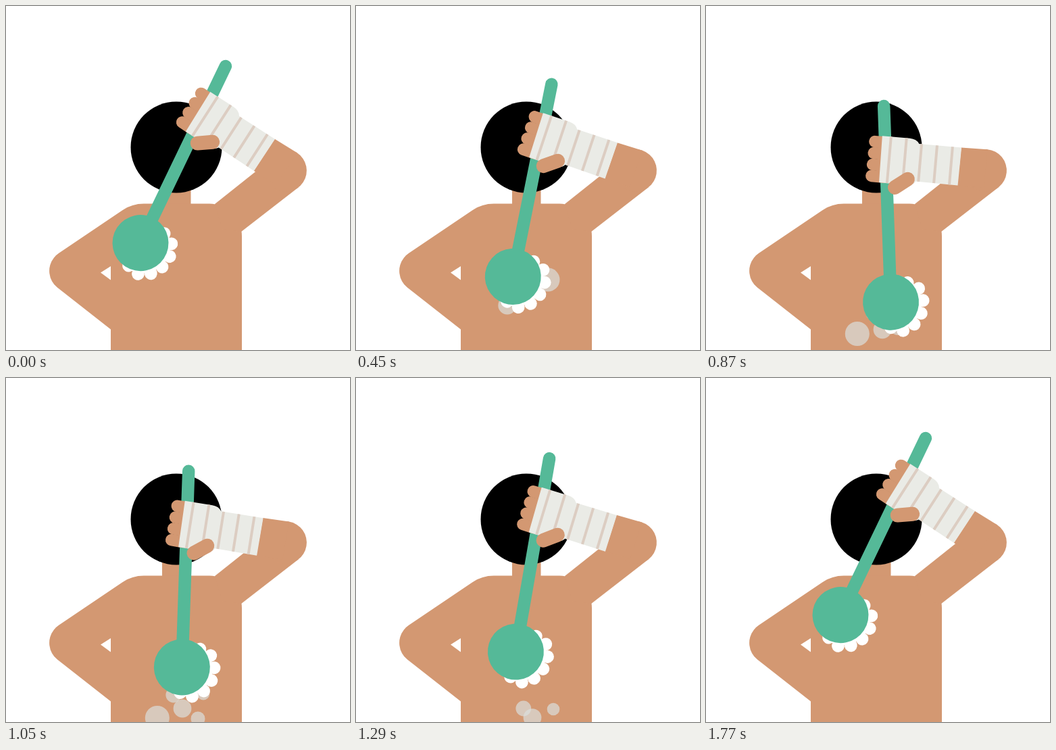
These frames come from a looping animation (509 by 509 pixels, 1800 ms). An HTML page with a canvas:

```html
<!DOCTYPE html>
<html>
<head>
<meta charset="utf-8">
<style>
html, body { margin: 0; width: 100%; height: 100%; overflow: hidden; background: #fff; }
canvas { display: block; width: 509px; height: 509px; }
</style>
</head>
<body>
<canvas id="stage"></canvas>
<script>
const SIZE = 509, LOOP = 1800, STEP = 30;
const SKIN = '#d39872', GREEN = '#55b998', GAUZE = '#eaebe6', STRIPE = '#dccdc2';
const ELBOW = [413.5, 243.5], REST = 33.4, SWING = 28.7;
const RAD = Math.PI / 180;

const canvas = document.getElementById('stage');
const ratio = window.devicePixelRatio || 1;
canvas.width = canvas.height = Math.round(SIZE * ratio);
const ctx = canvas.getContext('2d');

function disc(x, y, r, color) {
  ctx.fillStyle = color;
  ctx.beginPath();
  ctx.arc(x, y, r, 0, 2 * Math.PI);
  ctx.fill();
}

function poly(color, points) {
  ctx.fillStyle = color;
  ctx.beginPath();
  points.forEach(p => ctx.lineTo(p[0], p[1]));
  ctx.fill();
}

function bar(x1, y1, x2, y2, width, color, cap = 'round') {
  ctx.strokeStyle = color;
  ctx.lineWidth = width;
  ctx.lineCap = cap;
  ctx.beginPath();
  ctx.moveTo(x1, y1);
  ctx.lineTo(x2, y2);
  ctx.stroke();
}

function drawBody() {
  ctx.fillStyle = SKIN;
  ctx.fillRect(231, 240, 42.5, 60);
  ctx.beginPath();
  ctx.moveTo(155, 510);
  ctx.lineTo(155, 478.5);
  ctx.arc(95.5, 392, 31.4, 128.5 * RAD, 236.4 * RAD);
  ctx.arc(204, 350, 57.4, 236.4 * RAD, 270 * RAD);
  ctx.arc(301, 340.6, 48, 270 * RAD, 360 * RAD);
  ctx.lineTo(349, 510);
  ctx.fill();
  poly('#fff', [[140, 394.5], [155, 385], [155, 405.5]]);
  // raised upper arm
  poly(SKIN, [[309, 293], [397, 223], [413.5, 243.5], [432.8, 268.2], [348, 334], [320, 330]]);
  disc(252, 209, 67.5, '#000');
}

// Soap drops: x, birth step, growth steps, radius at step i, height at step i
const drops = [
  [223.8, 9, 8, () => 18, i => 398 + 3 * i],
  [284, 10, 4, i => 17.5 - 0.35 * (i - 15), i => 405 + 4.95 * (i - 15)],
  [261, 20, 3, () => 13.4, i => 429.5 + 1.7 * i],
  [247.8, 22, 4, () => 11.4, i => 489 + 2.5 * (i - 43)],
  [292, 25, 4, () => 9.3, i => 490 + 3.3 * (i - 43) + 0.055 * (i - 43) ** 2]
];

function drawDrops(i) {
  for (const [x, birth, grow, radius, height] of drops) {
    const size = radius(i) * Math.min(1, (i - birth) / grow);
    if (size > 0) disc(x, height(i), size, 'rgba(219,223,222,0.69)');
  }
}

function drawBrush() {
  const x = -120.1, y = 207.5, axis = (48 - REST) * RAD;
  disc(x + 5 * Math.cos(axis), y + 5 * Math.sin(axis), 41, '#fff');
  for (let k = -3; k <= 3; k++) {
    const a = axis + 23.2 * k * RAD;
    const d = 47.8 - 10 * (k / 3) ** 4;
    disc(x + d * Math.cos(a), y + d * Math.sin(a), 9.4, '#fff');
  }
  bar(x, y, -159, -80.2, 18.5, GREEN);
  disc(x, y, 41.5, GREEN);
}

function drawForearm() {
  disc(0, 0, 31.4, SKIN);
  poly(SKIN, [[0, -31.4], [-39, -30.3], [-39, 26], [0, 26]]);
  for (let k = 0; k < 4; k++) bar(-167, -26.5 + 17 * k, -150, -26.5 + 17 * k, 17.6, SKIN);

  ctx.save();
  ctx.beginPath();
  ctx.moveTo(-157, -36);
  ctx.lineTo(-116, -36.4);
  ctx.quadraticCurveTo(-106, -36.4, -101.5, -29.6);
  ctx.lineTo(-38.6, -30.3);
  ctx.lineTo(-38.6, 26);
  ctx.lineTo(-101, 26);
  ctx.quadraticCurveTo(-105, 33, -115, 33);
  ctx.lineTo(-155, 33);
  ctx.closePath();
  ctx.fillStyle = GAUZE;
  ctx.fill();
  ctx.clip();
  for (let k = 0; k < 5; k++) {
    const x = -143.5 + 23 * k;
    bar(x - 0.5, -45, x + 0.5, 45, 4, STRIPE, 'butt');
  }
  ctx.restore();
  bar(-131, 38, -113.3, 24, 21, SKIN);
}

function draw(time) {
  const i = Math.floor((time % LOOP) / STEP);
  const swing = SWING * (i <= 30 ? i / 30 : (59 - i) / 29);
  ctx.setTransform(ratio, 0, 0, ratio, 0, 0);
  ctx.fillStyle = '#fff';
  ctx.fillRect(0, 0, SIZE, SIZE);
  drawBody();
  drawDrops(i);
  ctx.translate(...ELBOW);
  ctx.rotate((REST - swing) * RAD);
  drawBrush();
  drawForearm();
}

let start = null;
function tick(now) {
  if (start === null) start = now;
  draw(now - start);
  requestAnimationFrame(tick);
}
draw(0);
requestAnimationFrame(tick);
</script>
</body>
</html>
```
